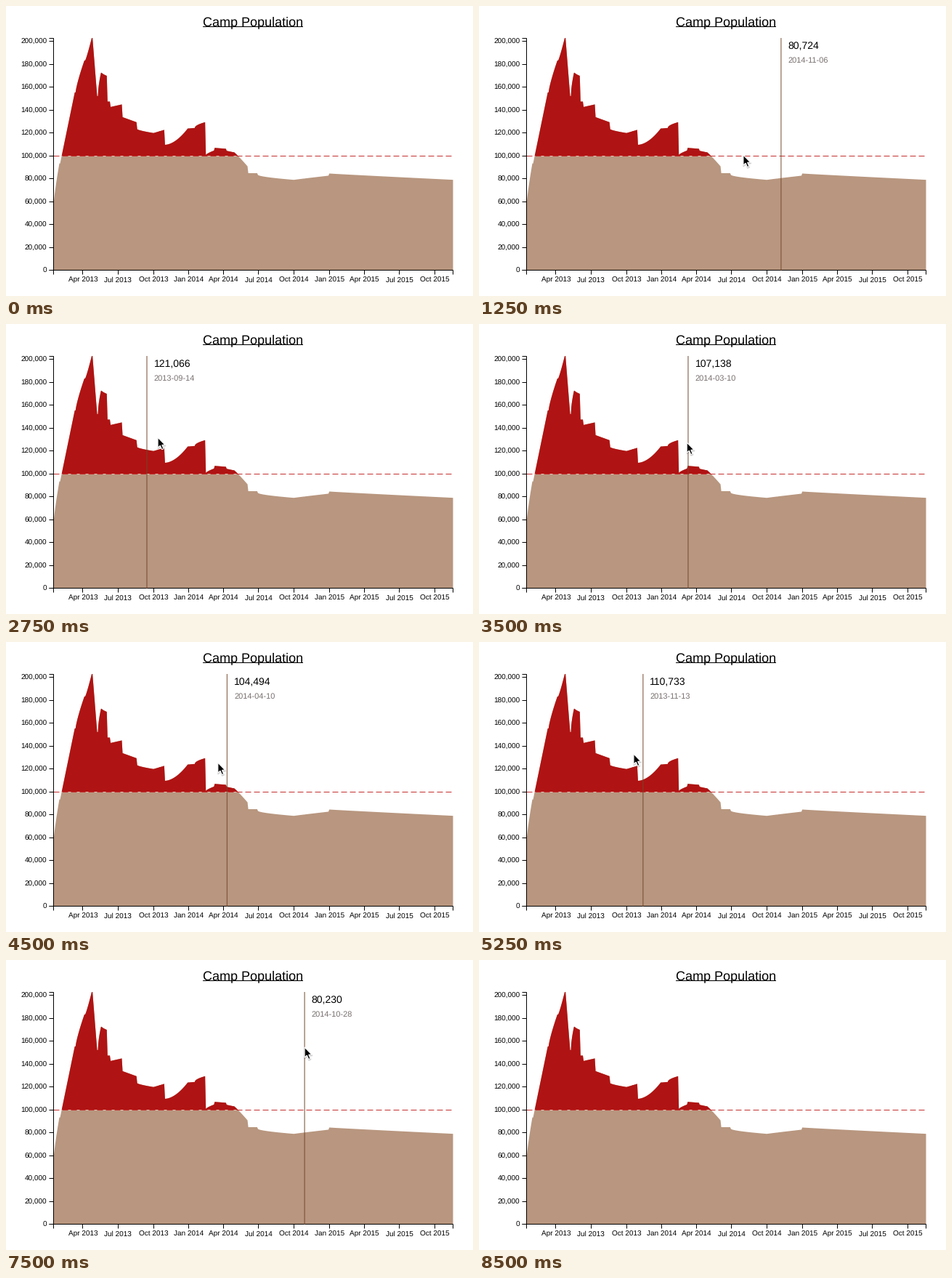
A matplotlib script that plays this animation: 643 by 399 pixels, repeating every 9000 ms.

```python
import numpy as np
import matplotlib.pyplot as plt
from matplotlib.animation import FuncAnimation
from matplotlib.patches import Polygon, Rectangle

W, H, DPI = 643, 399, 64
PT = 72 / DPI                       # points per pixel
STEP, LOOP = 250, 9000
ENTER, LEAVE, GONE = 1250, 8250, 8500
LEAD = 120                          # the marker trails the pointer by this, ms

LEFT, RIGHT, TOP, BASE = 65.5, 615.5, 44, 364
START, DAYS = np.datetime64("2013-01-15"), 1036
PX_DAY = (RIGHT - LEFT) / DAYS
PX_HEAD = (BASE - TOP) / 203000
LIMIT = 100000
JUMP = 2                            # days between two phases

TAN, RED, DASH = "#b8967f", "#b01313", "#c4302f"
GREY, BROWN = "#797170", "#74472c"

# Phases of the camp: first day, thousands at start and end, bend.
PHASES = [
    (0, 57, 93.5, .8), (17, 93.5, 155.5, 1), (57, 155.5, 183.4, .8),
    (82, 183.4, 203, 1.15), (101, 203, 152.3, 1), (115, 152.3, 172.6, .6),
    (125, 172.6, 170, .7), (140, 147.5, 147.5, 1), (148, 142.8, 145, 1),
    (179, 133.9, 129.5, 1), (217, 123.4, 120.1, .7), (260, 120.1, 122.8, 1),
    (289, 109.8, 124, 1.8), (350, 124, 124.4, 1), (366, 124.4, 129.5, .5),
    (395, 100.9, 104.7, .7), (418, 107.1, 106.3, 1), (449, 104.5, 103.3, 1),
    (468, 103.3, 91, 1.1), (505, 85, 85, 1), (530, 83.5, 79.2, .6),
    (624, 79.2, 82.8, .95), (715, 84.7, 79.2, .95)]
REPORTS = {"2013-09-24": 120546, "2013-10-17": 121776, "2014-03-10": 107138,
           "2014-04-10": 104494, "2014-10-28": 80230}

# Sweeps of the pointer: time, date under the marker, pointer height.
STOPS = [
    (1250, "2014-11-06", 205), (1750, "2013-09-24", 150),
    (2000, "2013-06-16", 150), (2300, "2013-05-31", 152),
    (3500, "2014-03-10", 163), (3750, "2014-03-03", 164),
    (4500, "2014-04-10", 166), (5500, "2013-09-24", 150),
    (6000, "2013-10-17", 148), (6650, "2013-10-17", 148),
    (7500, "2014-10-28", 120), (7650, "2014-10-28", 103),
    (8000, "2014-12-28", 48), (8250, "2014-12-30", 3)]
ARROW = np.array([(0, 0), (0, 14.2), (3.2, 11.2), (5.6, 16.6), (8, 15.6),
                  (5.7, 10.3), (10, 10.3)])

plt.rcParams.update({"font.family": "Liberation Sans", "text.hinting": "none",
                     "toolbar": "None"})


def day_x(day):
    return LEFT + day * PX_DAY


def head_y(count):
    return BASE - count * PX_HEAD


def date_day(text):
    return int((np.datetime64(text) - START).astype(int))


def daily_counts():
    heads = np.full(DAYS + 1, np.nan)
    starts = [p[0] for p in PHASES] + [DAYS + JUMP]
    for (first, low, high, bend), following in zip(PHASES, starts[1:]):
        span = following - JUMP - first
        u = np.linspace(0, 1, span + 1)
        heads[first:first + span + 1] = 1000 * (low + (high - low) * u ** bend)
    for date, count in REPORTS.items():
        heads[date_day(date)] = count
    days = np.arange(DAYS + 1)
    known = ~np.isnan(heads)
    return days, np.interp(days, days[known], heads[known])


days, heads = daily_counts()
stop_t = [s[0] for s in STOPS]
stop_day = [date_day(s[1]) for s in STOPS]
stop_y = [s[2] for s in STOPS]

fig = plt.figure(figsize=(W / DPI, H / DPI), dpi=DPI, facecolor="white")
ax = fig.add_axes([0, 0, 1, 1])
ax.set_xlim(0, W)
ax.set_ylim(H, 0)
ax.axis("off")


def line(xs, ys, color="black", width=1, **kw):
    return ax.plot(xs, ys, color=color, lw=width * PT, snap=False,
                   solid_capstyle="butt", dash_capstyle="butt",
                   solid_joinstyle="miter", **kw)[0]


def text(x, y, s, size, ha="left", color="black", **kw):
    return ax.text(x, y, s, fontsize=size * PT, ha=ha, va="baseline",
                   color=color, **kw)


def draw_chart():
    edge = np.column_stack([day_x(days), head_y(heads)])
    shape = np.vstack([edge, (RIGHT, BASE), (LEFT, BASE)])
    cut = np.floor(head_y(LIMIT))
    ax.add_patch(Polygon(shape, fc=TAN, lw=0, zorder=1))
    over = ax.add_patch(Polygon(shape, fc=RED, lw=0, zorder=1))
    over.set_clip_path(Rectangle((0, 0), W, cut, transform=ax.transData))
    crowded = day_x(days[heads >= LIMIT])
    line([crowded[0], crowded[-1]], [cut + .5] * 2, "#dcc3b3", zorder=2)
    line([LEFT, RIGHT], [cut + .5] * 2, DASH, linestyle=(0, (8, 4)), zorder=2)


def draw_axes():
    floor = BASE - .5
    line([LEFT - 6, LEFT, LEFT, LEFT - 6], [TOP + .5, TOP + .5, floor, floor])
    line([LEFT, LEFT, RIGHT, RIGHT], [floor + 6, floor, floor, floor + 6])
    for count in range(0, 200001, 20000):
        y = np.ceil(head_y(count)) - .5
        line([LEFT - 6, LEFT], [y, y])
        text(56.3, y + 3.5, f"{count:,}", 10, "right")
    names = {1: "Jan", 4: "Apr", 7: "Jul", 10: "Oct"}
    for i in range(11):
        year, month = 2013 + (i + 1) // 4, (i + 1) % 4 * 3 + 1
        x = day_x(date_day(f"{year}-{month:02d}-01"))
        tick = np.floor(x) + .5
        line([tick, tick], [floor, floor + 6])
        text(x, 380, f"{names[month]} {year}", 10, "center")
    text(340, 27, "Camp Population", 18, "center")
    line([271, 409], [28.5, 28.5])


draw_chart()
draw_axes()

marker = line([0, 0], [TOP, BASE], BROWN, 1.25, alpha=.78, zorder=4)
count_label = text(0, 59, "", 14, zorder=5)
date_label = text(0, 78, "", 11, color=GREY, zorder=5)
shadow = ax.add_patch(Polygon(ARROW, fc="black", ec="black", lw=2 * PT,
                              alpha=.15, joinstyle="round", zorder=6))
pointer = ax.add_patch(Polygon(ARROW, fc="black", ec="white", lw=1.2 * PT,
                               joinstyle="miter", zorder=7))


def update(i):
    t = i * STEP
    day = int(round(np.interp(t, stop_t, stop_day)))
    mx = day_x(day)
    tip = np.array([day_x(np.interp(t + LEAD, stop_t, stop_day)),
                    np.interp(t, stop_t, stop_y)])
    for part in (marker, count_label, date_label):
        part.set_visible(ENTER <= t < LEAVE)
    for part in (shadow, pointer):
        part.set_visible(ENTER <= t < GONE)
    marker.set_xdata([mx, mx])
    count_label.set_position((mx + 9.6, 59))
    count_label.set_text(f"{int(round(heads[day])):,}")
    date_label.set_position((mx + 9.6, 78))
    date_label.set_text(str(START + day))
    pointer.set_xy(ARROW + tip)
    shadow.set_xy(ARROW + tip + (.3, 1.2))
    return marker, count_label, date_label, shadow, pointer


anim = FuncAnimation(fig, update, frames=LOOP // STEP, interval=STEP,
                     init_func=lambda: update(0), repeat=True, repeat_delay=0)
plt.show()
```
